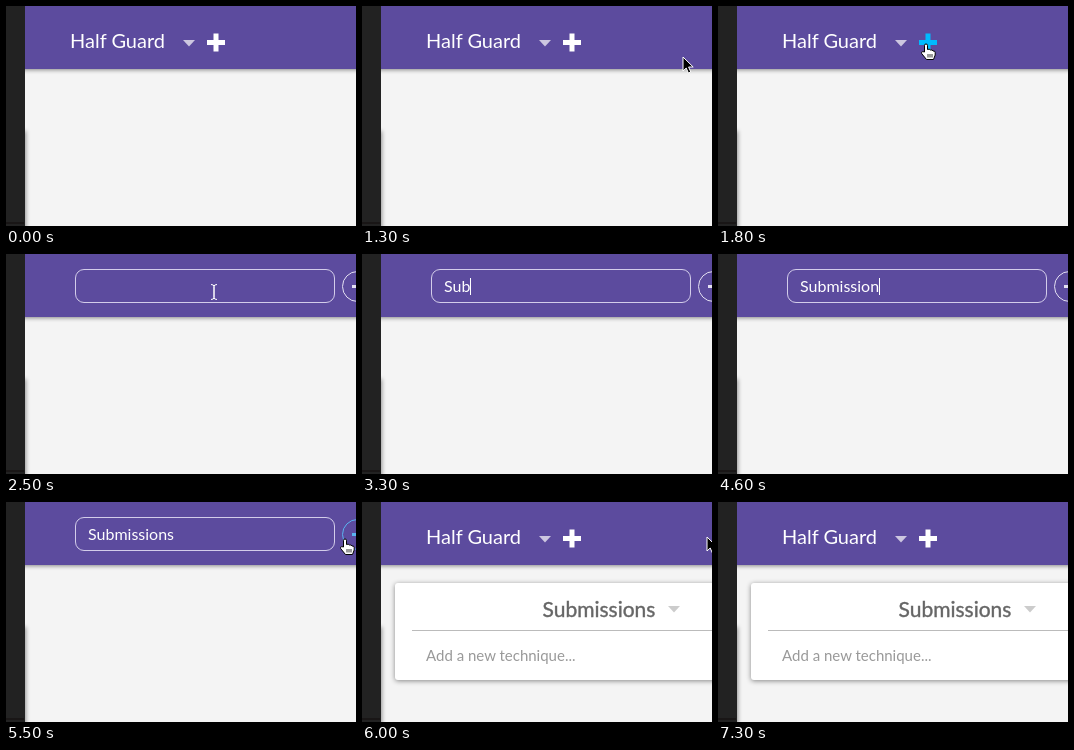
Animation of 350x220 px, one loop 7700 ms. Source, as an HTML page:

```html
<!DOCTYPE html>
<html lang="en">
<head>
<meta charset="utf-8">
<title>Add a category</title>
<style>
html, body { margin: 0; height: 100%; overflow: hidden; background: #f4f4f4; }
svg { display: block; width: 100vw; height: 100vh; font-family: Lato, sans-serif; }
.bar { fill: #5c4b9e; filter: drop-shadow(0 1px 2px rgba(0,0,0,.45)); }
.side { fill: #222; filter: drop-shadow(1px 0 2px rgba(0,0,0,.4)); }
.card { fill: #fff; filter: drop-shadow(0 1.5px 2.5px rgba(0,0,0,.45)); }
.outline { fill: none; stroke: #d3cdea; }
</style>
</head>
<body>
<svg viewBox="0 0 350 220">
  <rect width="350" height="220" fill="#f4f4f4"/>
  <rect class="side" y="125" width="19" height="110"/>
  <rect class="bar" x="10" y="-10" width="360" height="73"/>
  <rect width="19" height="220" fill="#222"/>
  <path d="M0 217h18" stroke="#191616" stroke-width="2"/>

  <g id="title">
    <text x="64" y="42" font-size="20" fill="#fff">Half Guard</text>
    <path d="M177 34h12l-6 6.5z" fill="#cdc7e0"/>
    <path id="plus" d="M203.5 36.5h13M210 30v13" stroke-width="5" stroke-linecap="square"/>
  </g>

  <g id="form">
    <rect class="outline" x="69.5" y="15.5" width="259" height="33" rx="8.5"/>
    <text id="typed" x="82" y="38" font-size="16" fill="#fff"></text>
    <path id="caret" d="M.5 24v17" stroke="#fff"/>
    <g id="add" fill="none">
      <circle cx="351.5" cy="32.5" r="15"/>
      <path d="M346 32.5h11M351.5 27v11" stroke-width="3"/>
    </g>
  </g>

  <g id="panel">
    <rect class="card" x="33" y="81" width="340" height="97" rx="3"/>
    <text x="180.5" y="115" font-size="21" fill="#666" stroke="#666" stroke-width=".4">Submissions</text>
    <path d="M306 104h12l-6 6.5z" fill="#ccc"/>
    <path d="M50 128.5h300" stroke="#bbb"/>
    <text x="64" y="159" font-size="15" fill="#999">Add a new technique...</text>
  </g>

  <g id="arrow"><path d="M0 0v14l3.2-3 2.2 5 2.4-1-2.2-5h4.6z" fill="#000" stroke="#fff"/></g>
  <g id="hand">
    <path d="M-1.5 8V1.3Q-1.5 0 0 0T1.5 1.3V5.5Q3.5 4.6 4.4 6Q6.4 5.4 7 7Q9.2 6.6 9.2 8.6V11L7.5 15.5H0.5L-4.3 9.6Q-5 8-3.3 7.6Z" fill="#fff" stroke="#000"/>
    <path d="M2 10v3.5M4 10v3.5M6 10v3.5" stroke="#000" stroke-width=".8"/>
  </g>
  <g id="beam"><path d="M-3-7.5q3 0 3 2v11q0 2-3 2M3-7.5q-3 0-3 2v11q0 2 3 2" fill="none" stroke="#fff"/></g>
</svg>
<script>
const $ = id => document.getElementById(id);
const LOOP = 7700, WORD = "Submissions";
const keys = [2900, 3200, 3300, 3500, 3700, 3900, 4100, 4300, 4400, 4600, 4800];
const pointer = [
  // time, x, y
  [1300, 321, 51], [1500, 262, 44], [1700, 215, 39], [1800, 208, 38],
  [5100, 208, 38], [5300, 285, 36], [5500, 339, 37], [5800, 339, 37], [6000, 345, 35], [6200, 352, 34]
];

const ramp = (t, from, to) => Math.max(0, Math.min(1, (t - from) / (to - from)));
const within = (t, from, to) => t >= from && t < to;
const show = (id, on) => $(id).setAttribute("opacity", +on);

function position(t) {
  const i = pointer.findIndex(p => p[0] > t);
  if (i < 1) return pointer.at(i).slice(1);
  const [a, b] = [pointer[i - 1], pointer[i]], k = ramp(t, a[0], b[0]);
  return [1, 2].map(n => a[n] + (b[n] - a[n]) * k);
}

function draw(t) {
  const open = ramp(t, 1900, 2300) * (1 - ramp(t, 5500, 5900));
  show("title", 1 - open);
  show("form", open);
  show("panel", ramp(t, 5800, 6000));
  $("plus").setAttribute("stroke", within(t, 1800, 2300) ? "#0bf" : "#fff");
  $("add").setAttribute("stroke", within(t, 5400, 5900) ? "#5ab4f0" : "#e4e0f2");

  $("typed").textContent = WORD.slice(0, keys.filter(k => k <= t).length);
  const end = Math.round(82 + $("typed").getComputedTextLength());
  $("caret").setAttribute("transform", `translate(${end})`);
  show("caret", t < 2500 || within(t, 2900, 5300));

  const at = `translate(${position(t)})`;
  for (const id of ["arrow", "hand", "beam"]) $(id).setAttribute("transform", at);
  show("arrow", within(t, 1300, 1800) || within(t, 5900, 6200));
  show("hand", within(t, 1800, 2100) || within(t, 5400, 5900));
  show("beam", within(t, 2100, 2900) || within(t, 5100, 5400));
}

function frame(now) {
  draw(Math.floor(now % LOOP / 100) * 100); // the picture moves in 100 ms steps
  requestAnimationFrame(frame);
}
draw(0);
requestAnimationFrame(frame);
</script>
</body>
</html>
```
